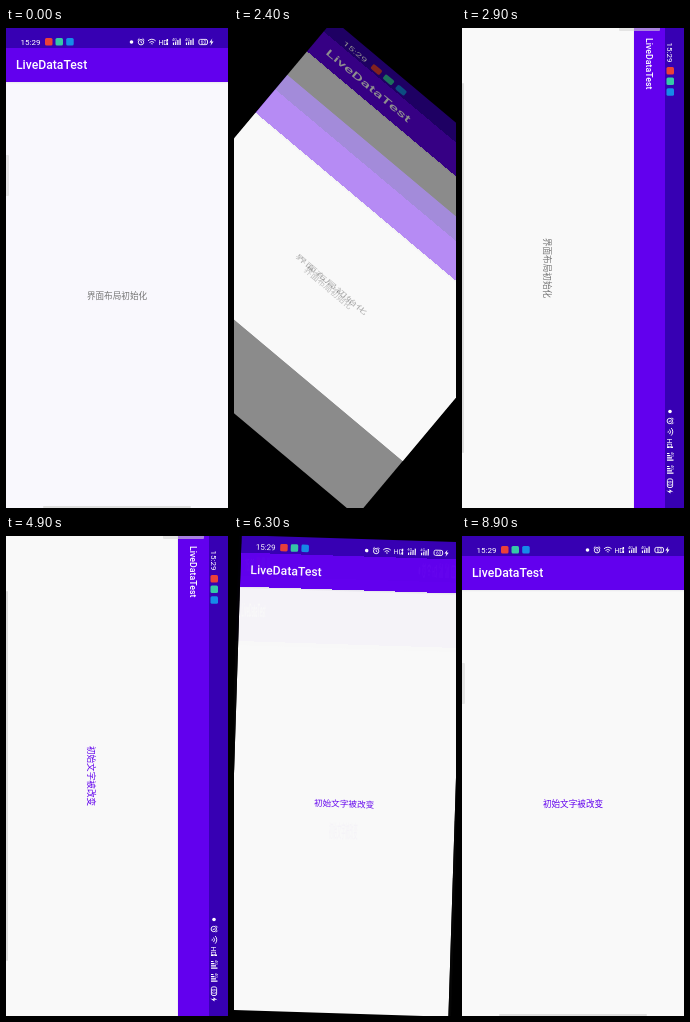
Write an HTML page that moves like this. It is 222 px wide and 480 px high and loops after 9 s.

```html
<!DOCTYPE html>
<html lang="zh">
<head>
<meta charset="utf-8">
<style>
html, body { margin: 0; width: 100%; height: 100%; overflow: hidden; background: #000; }
#stage { position: relative; width: 222px; height: 480px; overflow: hidden; background: #000; }
.screen { --page: #f9f9f9; --top: 20px; --bar: 54px;
  position: absolute; left: 50%; top: 50%; overflow: hidden;
  background: linear-gradient(#3700b3 var(--top), #6200ee var(--top) var(--bar),
    #e9e9ec var(--bar), var(--page) calc(var(--bar) + 2px)); }
.port { width: 222px; height: 480px; margin: -240px 0 0 -111px; }
.land { --top: 19px; --bar: 49.5px; width: 480px; height: 222px; margin: -111px 0 0 -240px; }
.screen > * { position: absolute; }
.status { left: 0; right: 0; top: 0; height: 20px; }
.status svg { position: absolute; top: 0; }
.title { left: 10px; top: 20px; color: #fff; white-space: nowrap;
  font: 500 12.2px/35px Roboto, sans-serif; }
.land .title { top: 19px; font-size: 8.8px; line-height: 32px; }
.label { left: 0; right: 0; top: 257px; text-align: center; white-space: nowrap;
  font: 8.6px/20px "Noto Sans CJK SC", "Noto Sans CJK", sans-serif; }
.land .label { top: 126px; }
.handle { left: 0; top: 127px; width: 3px; height: 41px; border-radius: 0 1px 1px 0; background: #d7d7d799; }
.land .handle { top: 24px; }
.pill { left: 37px; right: 37px; bottom: 0; height: 2px; border-radius: 1px; background: #dedede; }
.land .pill { left: 55px; right: 55px; }
</style>
</head>
<body>
<div id="stage"></div>
<script>
const LOOP = 9000, STEP = 100, LONG = 480, SHORT = 222;
const stage = document.getElementById('stage');

const signal = x => `
  <text x="${x}" y="13" font-size="4">4G</text>
  <path stroke="#fff" stroke-width="1.2"
    d="M${x + 1.5} 17v-2.5M${x + 3.7} 17v-3.5M${x + 5.9} 17v-5M${x + 8.1} 17v-6.5"/>`;

const icons = `
  <svg style="left:0" width="80" height="20">
    <text x="14.5" y="16.6" font-size="8" font-family="Roboto, sans-serif" fill="#fff">15:29</text>
    <rect x="39" y="10" width="7.5" height="7.5" rx="1.5" fill="#ec4038"/>
    <rect x="49.5" y="10" width="7.5" height="7.5" rx="1.5" fill="#35c9a6"/>
    <rect x="60.2" y="10" width="7.5" height="7.5" rx="1.5" fill="#168be8"/>
  </svg>
  <svg style="right:0" width="102" height="20" fill="#fff" font-family="Roboto, sans-serif">
    <circle cx="5.5" cy="14" r="1.8"/>
    <g stroke="#fff" stroke-width=".9" fill="none">
      <circle cx="15" cy="14.2" r="2.7"/>
      <path d="M15 12.6v1.8l1.2.7M11.7 12l1.6-1.5M18.3 12l-1.6-1.5"/>
      <path d="M22 12.8a5.4 5.4 0 0 1 7.6 0M23.5 14.5a3.3 3.3 0 0 1 4.6 0M24.9 16a1.3 1.3 0 0 1 1.8 0"/>
      <path d="M41.3 11v2.6M41.3 14.4v2.6" stroke-width="1.5"/>
      <rect x="72.9" y="11.4" width="8.6" height="5.2" rx="1.6"/>
    </g>
    <text x="32.5" y="16.7" font-size="6.8">HD</text>
    ${signal(46)}${signal(59)}
    <text x="74.8" y="15.7" font-size="4.6">60</text>
    <path d="M86.3 10.5l-3 4h2l-.8 3.2 3-4.2h-2z"/>
  </svg>`;

function makeScreen(kind) {
  const el = document.createElement('div');
  el.className = 'screen ' + kind;
  el.innerHTML = `<div class="status">${icons}</div>
    <div class="title">LiveDataTest</div><div class="label"></div>
    <div class="handle"></div><div class="pill"></div>`;
  stage.append(el);
  const part = name => el.querySelector('.' + name);
  return { el, label: part('label'), handle: part('handle'), pill: part('pill') };
}

const port = makeScreen('port'), land = makeScreen('land');
const clamp = v => Math.min(1, Math.max(0, v));

// cubic-bezier(.4, 0, .2, 1)
function ease(x) {
  let lo = 0, hi = 1;
  for (let i = 0; i < 24; i++) {
    const s = (lo + hi) / 2, r = 1 - s;
    if (1.2 * s * r * r + .6 * s * s * r + s ** 3 < x) lo = s; else hi = s;
  }
  return lo * lo * (3 - 2 * lo);
}

const progress = (t, start, length) => {
  const x = clamp((t - start) / length);
  return x === 0 || x === 1 ? x : ease(x);
};

// The old screen stretches to the new bounds and fades while both turn;
// the new one keeps its size, cropped to the same growing box.
function turn(from, to, p, angle) {
  const grow = 1 + p * (LONG / SHORT - 1), shrink = 1 - p * (1 - SHORT / LONG);
  const scale = from === port ? [grow, shrink] : [shrink, grow];
  const crop = (LONG - SHORT * grow) / 2 + 'px';
  Object.assign(from.el.style, {
    transform: `rotate(${angle}deg) scale(${scale})`,
    opacity: 1 - p, zIndex: 1, clipPath: 'none'
  });
  Object.assign(to.el.style, {
    transform: `rotate(${angle}deg)`,
    opacity: p > 0 ? 1 : 0, zIndex: 0,
    clipPath: to === port ? `inset(${crop} 0)` : `inset(0 ${crop})`
  });
}

function draw(t) {
  const back = t >= 5800;
  const p = back ? progress(t, 6022, 340) : progress(t, 2310, 274);
  if (back) turn(land, port, p, 90 * (1 - p));
  else turn(port, land, p, 90 * p);

  const changed = t >= 3500;
  for (const s of [port, land]) {
    s.label.textContent = changed ? '初始文字被改变' : '界面布局初始化';
    s.label.style.color = changed ? '#6200ee' : '#757575';
  }

  const upright = t < 2400 || t >= 6600;
  const lying = t >= 2900 && t < 5800;
  port.pill.style.opacity = upright ? 1 : 0;
  land.pill.style.opacity = land.handle.style.opacity = lying ? 1 : 0;
  port.handle.style.opacity = t >= 6600 ? 1 : 1 - clamp((t - 1300) / 800);

  const tint = 1 - clamp(t / 2100);
  port.el.style.setProperty('--page', `rgb(249, ${249 - tint}, ${249 + 4 * tint})`);
}

const begin = performance.now();
function tick() {
  const t = (performance.now() - begin) % LOOP;
  draw(Math.floor(t / STEP) * STEP);
  requestAnimationFrame(tick);
}
tick();
</script>
</body>
</html>
```
